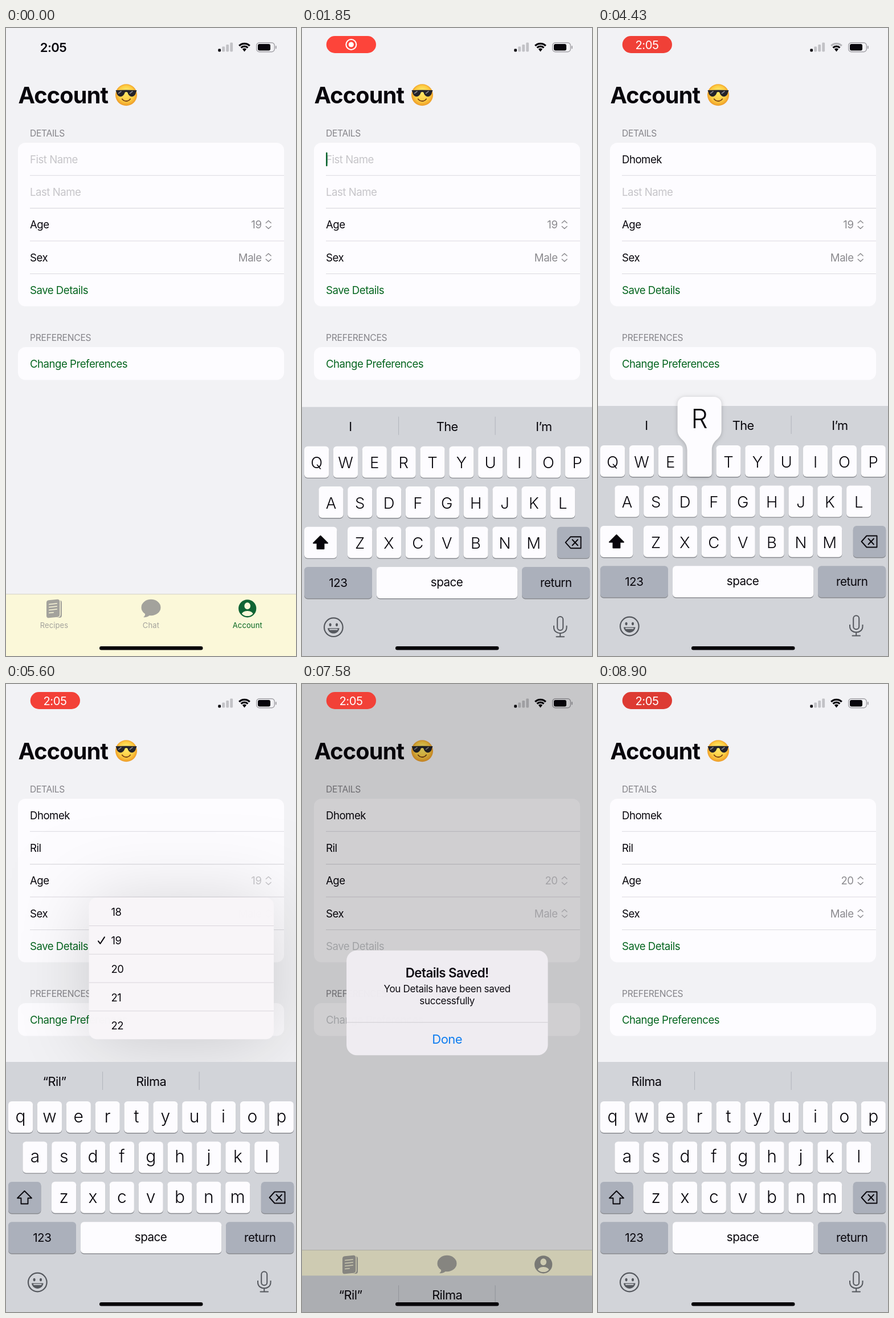
An HTML page with a canvas for the animation above (8.92 s loop, 509x1100 px).

```html
<!DOCTYPE html>
<html lang="en">
<head>
<meta charset="utf-8">
<title>Account form</title>
<style>
html, body { margin: 0; width: 100%; height: 100%; overflow: hidden; background: #f2f2f5; }
canvas { display: block; width: 509px; height: 1100px; }
</style>
</head>
<body>
<canvas id="stage"></canvas>
<script>
const W = 509, H = 1100, LOOP = 8920;
const canvas = document.getElementById('stage');
const dpr = window.devicePixelRatio || 1;
canvas.width = W * dpr;
canvas.height = H * dpr;
const c = canvas.getContext('2d');

const INK = '#08060c', GREEN = [4, 101, 30];
const ROWS = ['qwertyuiop', 'asdfghjkl', 'zxcvbnm'];
const ROW_X = [4, 29.3, 80], STEP = 50.85, KEY_W = 43.2, KEY_H = 55;
const TYPE_LAG = 40, HOLD = 105;

// Key presses: time and letter
const FIRST = [[2010, 'D'], [2150, 'h'], [2270, 'o'], [2400, 'm'], [2530, 'e'], [2660, 'k']];
const LAST = [[4410, 'R'], [4550, 'i'], [4680, 'l']];
const FOCUS_FIRST = 1450, FOCUS_LAST = 3650, SAVE = 7400;

const clamp = v => Math.max(0, Math.min(1, v));
const ramp = (t, start, len) => 1 - (1 - clamp((t - start) / len)) ** 3;
const span = (t, a, b, len) => ramp(t, a, len) * (1 - ramp(t, b, len));
const mix = (a, b, k) => `rgb(${a.map((v, i) => Math.round(v + (b[i] - v) * k))})`;
const typed = (keys, t) => keys.filter(k => t >= k[0] + TYPE_LAG).map(k => k[1]).join('');

// y is the middle of the capital letters
function text(s, x, y, size, color, { weight = 400, align = 'left', track = -0.026 } = {}) {
  c.font = `${weight} ${size}px Inter, "Liberation Sans", sans-serif`;
  c.letterSpacing = size * track + 'px';
  c.textAlign = align;
  c.fillStyle = color;
  c.fillText(s, x, y + size * 0.36);
  return c.measureText(s).width;
}
const mid = (s, x, y, size, color, opt) => text(s, x, y, size, color, { align: 'center', ...opt });

function box(x, y, w, h, r, color) {
  c.beginPath();
  c.roundRect(x, y, w, h, r);
  c.fillStyle = color;
  c.fill();
}
function disc(x, y, r, color, ry = r) {
  c.beginPath();
  c.ellipse(x, y, r, ry, 0, 0, Math.PI * 2);
  c.fillStyle = color;
  c.fill();
}
function line(points, color, width = 1.2, close) {
  c.beginPath();
  points.forEach(p => c.lineTo(...p));
  if (close) c.closePath();
  c.strokeStyle = color;
  c.lineWidth = width;
  c.lineCap = c.lineJoin = 'round';
  c.stroke();
}
function arc(x, y, r, a, b, color, width) {
  c.beginPath();
  c.arc(x, y, r, a, b);
  c.strokeStyle = color;
  c.lineWidth = width;
  c.lineCap = 'butt';
  c.stroke();
}
function layer(alpha, draw) {
  if (alpha <= 0) return;
  c.save();
  c.globalAlpha = alpha;
  draw();
  c.restore();
}
function shadow(blur, y, alpha) {
  c.shadowColor = `rgba(0,0,0,${alpha})`;
  c.shadowBlur = blur * dpr;
  c.shadowOffsetY = y * dpr;
}

function statusBar(t) {
  [5, 9, 12.5, 16].forEach((h, i) => box(372.3 + i * 7, 41.5 - h, 4.8, h, 1.4, i ? '#c2c2c6' : INK));
  const weak = t > 4000 && t < 5000;
  const a = -Math.PI * 0.75, b = -Math.PI * 0.25;
  arc(418.5, 40.5, 13.2, a, b, weak ? '#b5b5b9' : INK, 3.2);
  arc(418.5, 40.5, 8.4, a, b, INK, 3.2);
  c.beginPath();
  c.moveTo(418.5, 41.5);
  c.arc(418.5, 40.5, 5, a, b);
  c.fillStyle = INK;
  c.fill();
  c.beginPath();
  c.roundRect(439.7, 25.7, 31.6, 16, 5);
  c.strokeStyle = '#a3a2a7';
  c.lineWidth = 1.4;
  c.stroke();
  box(442, 28, 22, 11.5, 3, INK);
  box(472.8, 31, 2, 5.6, 1.5, '#a3a2a7');
}

function clock(t) {
  const on = ramp(t, 500, 300);
  layer(1 - on, () => mid('2:05', 83, 34, 22, INK, { weight: 600 }));
  layer(on, () => {
    const glow = 0.5 + 0.5 * Math.cos((t - 7980) / 1000 * Math.PI);
    box(42.7, 14, 87.3, 30, 15, mix([220, 59, 51], [254, 68, 58], glow));
    const toTime = ramp(t, 2150, 250);
    layer(on * (1 - toTime), () => {
      arc(86.3, 29, 9, 0, 7, '#fff', 2.1);
      disc(86.3, 29, 4.6, '#fff');
    });
    layer(on * toTime, () => mid('2:05', 86, 29.5, 20.2, '#fff', { track: -0.02 }));
  });
}

function coolFace() {
  const g = c.createRadialGradient(211, 111, 3, 211, 117, 20);
  g.addColorStop(0, '#ffe766');
  g.addColorStop(0.65, '#fdca40');
  g.addColorStop(1, '#eb9626');
  disc(211, 117.3, 19, g);
  c.fillStyle = '#23232a';
  c.beginPath();
  c.moveTo(192.5, 109);
  c.quadraticCurveTo(211, 108, 229.5, 109);
  c.lineTo(228, 113);
  c.bezierCurveTo(226.5, 122.5, 215.5, 122.5, 213.5, 113);
  c.quadraticCurveTo(211, 111, 208.5, 113);
  c.bezierCurveTo(206.5, 122.5, 195.5, 122.5, 194, 113);
  c.fill();
  line([[197.5, 114.5], [202, 111]], '#85858c', 1.6);
  line([[217.5, 114.5], [222, 111]], '#85858c', 1.6);
  arc(211, 119, 9, 0.55, Math.PI - 0.55, '#7a4316', 1.8);
}

function chevrons(y, color) {
  line([[456.3, y - 3], [460.7, y - 7], [465.1, y - 3]], color, 1.5);
  line([[456.3, y + 3], [460.7, y + 7], [465.1, y + 3]], color, 1.5);
}

function field(keys, hint, y, t, focused, since) {
  const s = typed(keys, t);
  const w = text(s || hint, 42, y, 18.6, s ? INK : '#c6c5c9');
  if (!focused) return;
  const last = keys.filter(k => t >= k[0] + TYPE_LAG).pop();
  const base = last ? last[0] + TYPE_LAG : since;
  if ((t - base) % 1000 < 500) box(42 + (s ? w : 0), y - 12.3, 2.6, 24.6, 1.3, '#0b6630');
}

function form(t, ageMenu, sexMenu, alert) {
  const tint = mix(GREEN, [200, 200, 205], alert);
  const soft = k => mix([139, 138, 142], [200, 199, 203], Math.max(k, alert));
  text('Account', 21.5, 117.5, 39.6, INK, { weight: 680, track: -0.02 });
  coolFace();
  text('DETAILS', 42, 184, 15.6, '#858489', { track: -0.02 });
  box(21, 201, 467, 286.5, 13, '#fdfcff');
  for (let i = 1; i < 5; i++) box(42, 200.3 + i * 57.4, 446, 1.1, 0, '#dbdadf');
  field(FIRST, 'Fist Name', 230, t, t >= FOCUS_FIRST && t < FOCUS_LAST, FOCUS_FIRST);
  field(LAST, 'Last Name', 287.3, t, t >= FOCUS_LAST && t < SAVE, FOCUS_LAST);
  text('Age', 42, 344.6, 18.6, INK);
  text('Sex', 42, 402, 18.6, INK);
  text(t < 6050 ? '19' : '20', 448.5, 344.6, 18.6, soft(ageMenu), { align: 'right' });
  chevrons(344.5, soft(ageMenu));
  text('Male', 448.5, 402, 18.6, soft(sexMenu), { align: 'right' });
  chevrons(402, soft(sexMenu));
  text('Save Details', 42, 459.4, 18.6, tint);
  text('PREFERENCES', 42, 542.3, 15.6, '#858489', { track: -0.015 });
  box(21, 559, 467, 57.5, 13, '#fdfcff');
  text('Change Preferences', 42, 588.2, 18.6, tint);
}

function tabBar(alert) {
  const off = '#a3a29c', paper = '#fbf8d9';
  box(0, 991, W, 109, 0, paper);
  box(0, 991, W, 1.2, 0, '#d9d8cc');
  // recipes
  box(78, 1002.5, 20, 30.5, 4, off);
  c.save();
  c.transform(1, -0.1, 0, 1, 0, 8.3);
  box(69.8, 1001, 26, 32.5, 5, paper);
  box(71, 1001.5, 23.3, 31, 4, off);
  [[7, 15], [12, 15], [17, 15], [22, 9]].forEach(([y, w]) => box(75, 1001 + y, w, 1.5, 0.7, paper));
  c.restore();
  // chat
  disc(254.5, 1015, 17, off, 14.2);
  c.beginPath();
  c.moveTo(244, 1024);
  c.quadraticCurveTo(245, 1030, 241, 1032);
  c.quadraticCurveTo(249, 1033, 254, 1027);
  c.fillStyle = off;
  c.fill();
  // account
  const tint = mix([16, 100, 52], [150, 149, 145], alert);
  disc(423.7, 1016.8, 15.6, tint);
  c.save();
  c.beginPath();
  c.arc(423.7, 1016.8, 13.3, 0, 7);
  c.clip();
  disc(423.7, 1012.3, 5.3, paper, 6);
  disc(423.7, 1028, 10.4, paper, 7);
  c.restore();
  const opt = { weight: 430, track: 0.01 };
  mid('Recipes', 84.5, 1046, 13, off, opt);
  mid('Chat', 254.5, 1046, 13, off, opt);
  mid('Account', 423.8, 1046, 13, mix(GREEN, [140, 139, 135], alert), opt);
}

function menu(items, checked, x, y, k) {
  layer(k, () => {
    const s = 0.4 + 0.6 * k, h = items.length * 50 - 0.5;
    c.translate(470, y);
    c.scale(s, s);
    c.translate(-470, -y);
    c.save();
    shadow(130, 8, 0.17);
    box(x, y, 470 - x, h, 14, '#f8f5f8');
    c.restore();
    items.forEach((item, i) => {
      const rowY = y + 25.7 + i * 50;
      if (i) box(x, y + i * 50 - 0.8, 470 - x, 1.1, 0, '#d9d5db');
      text(item, x + 39, rowY, 18.6, INK);
      if (item === checked) line([[x + 16.5, rowY + 1], [x + 20, rowY + 5.5], [x + 27.5, rowY - 6]], INK, 2);
    });
  });
}

function key(x, y, w, color) {
  box(x, y + 1.4, w, KEY_H, 6, '#898b90');
  box(x, y, w, KEY_H, 6, color);
}

function balloon(x, y, letter) {
  const top = y - 85, l = x - 17, r = x + KEY_W + 17, k = x + KEY_W;
  c.save();
  shadow(7, 1, 0.2);
  c.beginPath();
  c.moveTo(l, top + 58);
  c.lineTo(l, top + 13);
  c.arcTo(l, top, l + 13, top, 13);
  c.arcTo(r, top, r, top + 13, 13);
  c.lineTo(r, top + 58);
  c.bezierCurveTo(r, top + 76, k, top + 74, k, top + 94);
  c.arcTo(k, y + KEY_H, k - 6, y + KEY_H, 6);
  c.arcTo(x, y + KEY_H, x, y + KEY_H - 6, 6);
  c.lineTo(x, top + 94);
  c.bezierCurveTo(x, top + 74, l, top + 76, l, top + 58);
  c.fillStyle = '#fdfcff';
  c.fill();
  c.restore();
  mid(letter, x + KEY_W / 2, y - 47, 46, INK, { weight: 330, track: 0 });
}

function suggestions(t) {
  const late = t - 75, first = t < FOCUS_LAST;
  let words = ['I', 'The', 'I’m'];
  const s = typed(first ? FIRST : LAST, late);
  if (t > 7800) words = ['Rilma', '', ''];
  else if (s && first) words = [`“${s}”`, s.length > 2 ? 'Dhomek' : '', s.length > 2 ? 'Dhom’s' : ''];
  else if (s) words = [`“${s}”`, s.length > 1 ? 'Rilma' : '', ''];
  const fade = first ? 1 - clamp((t - 2650) / 130) : 1;
  words.forEach((word, i) => layer(i === 2 ? fade : 1, () => mid(word, 85 + i * 169.7, 696, 21.8, INK)));
  [169, 338.6].forEach(x => box(x, 679, 1.1, 32, 0, '#b4b7be'));
}

function keyboard(t, up) {
  if (up <= 0) return;
  c.save();
  c.translate(0, (1 - up) * 438);
  box(0, 662, W, 438, 0, '#d2d4d9');
  suggestions(t);

  const upper = !typed(t < FOCUS_LAST ? FIRST : LAST, t);
  const pressed = [...FIRST, ...LAST].find(k => t >= k[0] && t < k[0] + HOLD);
  let pop;
  ROWS.forEach((row, r) => [...row].forEach((ch, i) => {
    const x = ROW_X[r] + i * STEP, y = 731 + r * 70.4;
    key(x, y, KEY_W, '#fdfcff');
    if (pressed && pressed[1].toLowerCase() === ch) pop = [x, y, pressed[1]];
    else if (upper) mid(ch.toUpperCase(), x + KEY_W / 2, y + 28.8, 27.5, INK, { weight: 360, track: 0 });
    else mid(ch, x + KEY_W / 2, y + 26, 30, INK, { weight: 330, track: 0 });
  }));

  const dark = '#abb0bb';
  key(4, 872, 57.4, upper ? '#fdfcff' : dark);
  const arrow = [[32.5, 888], [45, 900.5], [38.5, 900.5], [38.5, 910.5], [26.5, 910.5], [26.5, 900.5], [20, 900.5]];
  line(arrow, INK, 1.9, true);
  if (upper) {
    c.fillStyle = INK;
    c.fill();
  }
  key(447.8, 872, 57.4, dark);
  line([[462.5, 899.5], [471.5, 889.5], [489.5, 889.5], [489.5, 909.5], [471.5, 909.5]], INK, 1.9, true);
  line([[474.5, 894.5], [484, 904.5]], INK, 1.9);
  line([[484, 894.5], [474.5, 904.5]], INK, 1.9);
  key(4, 942.3, 119, dark);
  key(131, 942.3, 247.3, '#fdfcff');
  key(386, 942.3, 119.2, dark);
  mid('123', 63.3, 970, 20.6, INK);
  mid('space', 254, 968.5, 20.6, INK);
  mid('return', 445.8, 970, 20.6, INK);

  // emoji and dictation
  const icon = '#55585e';
  arc(55.3, 1048, 16.3, 0, 7, icon, 2.2);
  disc(49.6, 1043.5, 2, icon, 2.8);
  disc(61, 1043.5, 2, icon, 2.8);
  c.beginPath();
  c.moveTo(45, 1049.5);
  c.lineTo(65.6, 1049.5);
  c.bezierCurveTo(64, 1062, 46.6, 1062, 45, 1049.5);
  c.fillStyle = icon;
  c.fill();
  box(48, 1050.8, 14.6, 2, 1, '#d2d4d9');
  c.beginPath();
  c.roundRect(448.2, 1029.3, 10, 24, 5);
  c.strokeStyle = icon;
  c.lineWidth = 2;
  c.stroke();
  c.beginPath();
  c.moveTo(442, 1045);
  c.lineTo(442, 1048);
  c.bezierCurveTo(442, 1062, 464.5, 1062, 464.5, 1048);
  c.lineTo(464.5, 1045);
  c.stroke();
  line([[453.2, 1058.5], [453.2, 1064]], icon, 2);
  line([[446.5, 1064.5], [460, 1064.5]], icon, 2);

  if (pop) balloon(...pop);
  c.restore();
}

function savedAlert(t, k) {
  layer(k, () => {
    const s = t < 8000 ? 1.15 - 0.15 * k : 1;
    c.translate(254.7, 558.5);
    c.scale(s, s);
    c.translate(-254.7, -558.5);
    box(78.7, 467, 352.3, 183, 18, '#f0edf2');
    mid('Details Saved!', 254.7, 506.5, 22.3, INK, { weight: 600 });
    mid('You Details have been saved', 254.7, 534.3, 17, INK, { track: -0.02 });
    mid('successfully', 254.7, 555.3, 17, INK, { track: -0.02 });
    box(78.7, 592, 352.3, 1.1, 0, '#d6d2d8');
    mid('Done', 254.7, 622, 22, '#0a7bf0');
  });
}

function draw(t) {
  c.setTransform(dpr, 0, 0, dpr, 0, 0);
  const ageMenu = span(t, 5400, 6050, 250);
  const sexMenu = span(t, 6420, 7000, 250);
  const alert = span(t, SAVE, 8420, 250);
  const up = t < 5000 ? ramp(t, 1530, 380)
    : t < 8300 ? 1 - ramp(t, SAVE, 380) : ramp(t, 8460, 380);

  box(0, 0, W, H, 0, '#f2f2f5');
  form(t, ageMenu, sexMenu, alert);
  tabBar(alert);
  statusBar(t);
  menu(['18', '19', '20', '21', '22'], '19', 144, 374, ageMenu);
  menu(['Male', 'Female', 'Other'], 'Male', 144, 431, sexMenu);
  keyboard(t, up);
  layer(alert, () => box(0, 0, W, H, 0, 'rgba(0,0,0,.185)'));
  savedAlert(t, alert);
  clock(t);
  box(164, 1083, 181.5, 6.6, 3.3, '#08060a');
}

let start;
function tick(now) {
  start ??= now;
  draw((now - start) % LOOP);
  requestAnimationFrame(tick);
}
draw(0);
requestAnimationFrame(tick);
</script>
</body>
</html>
```
